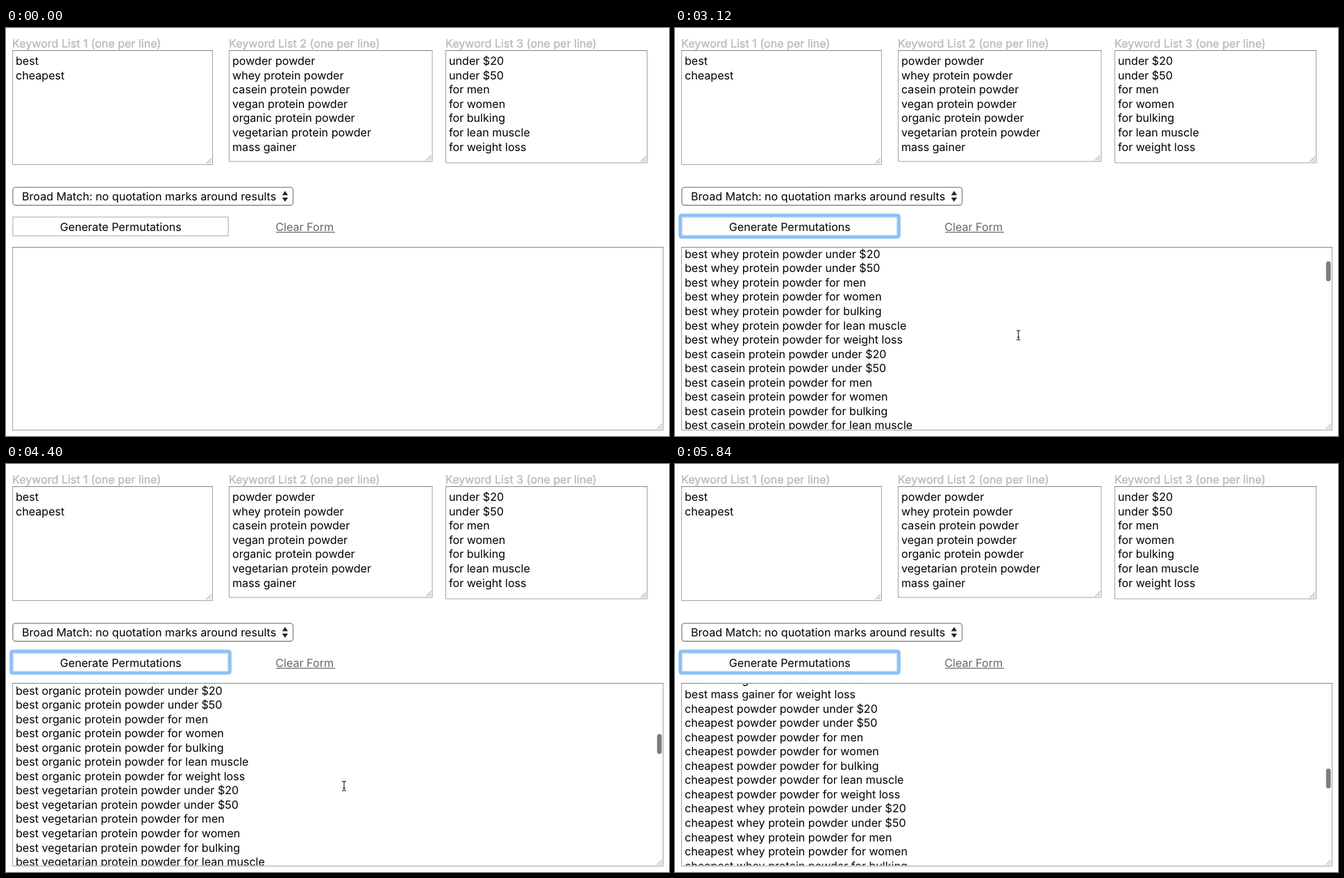
These frames come from a looping animation (955 px wide and 587 px high, 6.16 s). An HTML page with a canvas:

```html
<!DOCTYPE html>
<html lang="en">
<head>
<meta charset="utf-8">
<title>Keyword permutations</title>
<style>
  html, body { margin: 0; width: 100%; height: 100%; overflow: hidden; background: #fff; }
  canvas { display: block; width: 955px; height: 587px; }
</style>
</head>
<body>
<canvas id="stage" width="955" height="587"></canvas>
<script>
const ctx = document.getElementById('stage').getContext('2d');
const LOOP = 6160, STEP = 80, ROW = 20.55, LAST_SCROLL = 986.4;
const FONT = '16.1px Inter, "Liberation Sans", sans-serif';
const ENTER = 80, CLICK = 1440, SCROLL_START = 2720, LEAVE = 5760;

const proteins = ['whey', 'casein', 'vegan', 'organic', 'vegetarian'].map(kind => `${kind} protein powder`);
const lists = [
  { words: ['best', 'cheapest'], width: 289, height: 165 },
  { words: ['powder powder', ...proteins, 'mass gainer'], width: 293.5, height: 160.5 },
  { words: ['under $20', 'under $50', 'for men', 'for women', 'for bulking', 'for lean muscle', 'for weight loss'],
    width: 291, height: 162.5 }
];
const [firsts, middles, lasts] = lists.map(list => list.words);
const results = firsts.flatMap(a => middles.flatMap(b => lasts.map(c => `${a} ${b} ${c}`)));

const easeOut = p => 1 - (1 - p) ** 2.3;
const easeIn = p => p ** 1.7;
const easeInOut = p => p * p * (3 - 2 * p);

const entry = { x: 320, y: 557 };
const moves = [
  { from: ENTER, to: 1040, x: 199, y: 285, ease: easeInOut },
  { from: CLICK, to: 1840, x: 499, y: 430, ease: easeInOut },
  { from: SCROLL_START, to: 5200, x: 486, y: 466, ease: easeOut },
  { from: 5200, to: LEAVE, x: 479, y: 600, ease: easeIn }
];

function cursorAt(t) {
  let { x, y } = entry;
  for (const move of moves) {
    const progress = Math.min(1, Math.max(0, (t - move.from) / (move.to - move.from)));
    const p = move.ease(progress);
    x += (move.x - x) * p;
    y += (move.y - y) * p;
  }
  return { x, y };
}

function scrollAt(t) {
  const s = (t - SCROLL_START) / 1000;
  return s < 0 ? 0 : Math.min(LAST_SCROLL, 14 + s * (350 - 30 * s + 13.4 * s * s));
}

function text(str, x, y, color = '#000') {
  ctx.fillStyle = color;
  ctx.fillText(str, x, y);
}

function trace(points) {
  ctx.beginPath();
  points.forEach(([x, y]) => ctx.lineTo(x, y));
}

function line(color, width, ...points) {
  ctx.strokeStyle = color;
  ctx.lineWidth = width;
  trace(points);
  ctx.stroke();
}

function polygon(color, ...points) {
  ctx.fillStyle = color;
  trace(points);
  ctx.fill();
}

function roundBox(color, width, x, y, w, h, r) {
  ctx.strokeStyle = color;
  ctx.lineWidth = width;
  ctx.beginPath();
  ctx.roundRect(x, y, w, h, r);
  ctx.stroke();
}

function textArea(x, y, w, h) {
  roundBox('#a3a3a3', 1, x + .5, y + .5, w - 1, h - 1, 0);
  line('#858585', 1, [x, y + .5], [x + w, y + .5]);
  const right = x + w - 2, bottom = y + h - 2;
  for (const size of [7.5, 3.5]) line('#858585', 1, [right - size, bottom], [right, bottom - size]);
}

function drawLists() {
  lists.forEach(({ words, width, height }, i) => {
    const x = 9 + 312 * i, label = `Keyword List ${i + 1} (one per line)`;
    text(label, x, 28, '#bbb');
    ctx.strokeStyle = '#bbb';
    ctx.lineWidth = .4;
    ctx.strokeText(label, x, 28);
    textArea(x, 32, width, height);
    words.forEach((word, row) => text(word, x + 5, 53.2 + row * ROW));
  });
}

function drawControls(focused) {
  roundBox('#999', 1.6, 9.8, 229.3, 403.8, 25.8, 4);
  text('Broad Match: no quotation marks around results', 23, 248);
  for (const side of [-1, 1]) {
    const base = 242.2 + side * 1.7;
    polygon('#222', [397.8, base], [402, base + side * 6], [406.2, base]);
  }

  if (focused) {
    roundBox('rgba(137,192,251,.4)', 6, 7.5, 269.4, 315, 31.4, 3);
    roundBox('#88c0fb', 4, 7.5, 269.4, 315, 31.4, 2);
    roundBox('#a9c3de', 1, 10, 272, 310, 27, 0);
  } else {
    roundBox('#c4c4c4', 1.5, 9.8, 272, 310.4, 27, 0);
  }
  ctx.textAlign = 'center';
  text('Generate Permutations', 165.3, 291.7);
  ctx.textAlign = 'left';
  text('Clear Form', 388.3, 291.5, '#666');
  line('#666', 1.2, [389, 293.8], [474, 293.8]);
}

function drawOutput(t) {
  const scroll = scrollAt(t);
  if (t >= CLICK) {
    ctx.save();
    ctx.beginPath();
    ctx.rect(10, 316, 927, 261.5);
    ctx.clip();
    results.forEach((result, row) => text(result, 14, 337 + row * ROW - scroll));
    ctx.restore();
  }
  textArea(9, 315, 938, 264);
  if (t >= SCROLL_START) {
    ctx.fillStyle = '#7d7d7d';
    ctx.beginPath();
    ctx.roundRect(937.8, 317.5 + .1224 * scroll, 6.8, 28.5, 3.4);
    ctx.fill();
  }
}

function drawBeam() {
  for (const [color, width] of [['#fff', 2.6], ['#333', 1.2]]) {
    line(color, width, [0, -6], [0, 6]);
    line(color, width, [-1.8, 2.8], [1.8, 2.8]);
    for (const s of [-1, 1]) line(color, width, [-3, 7 * s], [-1, 6.7 * s], [0, 5.5 * s], [1, 6.7 * s], [3, 7 * s]);
  }
}

function drawArrow() {
  const arrow = [[0, 0], [0, 11.5], [2.6, 9.2], [4.3, 13.2], [6.2, 12.4], [4.5, 8.5], [8, 8.3]];
  line('#fff', 2, ...arrow, arrow[0]);
  polygon('#111', ...arrow);
}

function drawCursor(t) {
  if (t < ENTER || t >= LEAVE) return;
  const { x, y } = cursorAt(t);
  ctx.save();
  ctx.translate(x, y);
  if (y > 316) drawBeam();
  else drawArrow();
  ctx.restore();
}

function draw(now) {
  const t = Math.floor(now % LOOP / STEP) * STEP;
  ctx.fillStyle = '#fff';
  ctx.fillRect(0, 0, 955, 587);
  ctx.font = FONT;
  ctx.textRendering = 'geometricPrecision';
  drawLists();
  drawControls(t >= CLICK);
  drawOutput(t);
  drawCursor(t);
  requestAnimationFrame(draw);
}
requestAnimationFrame(draw);
</script>
</body>
</html>
```
